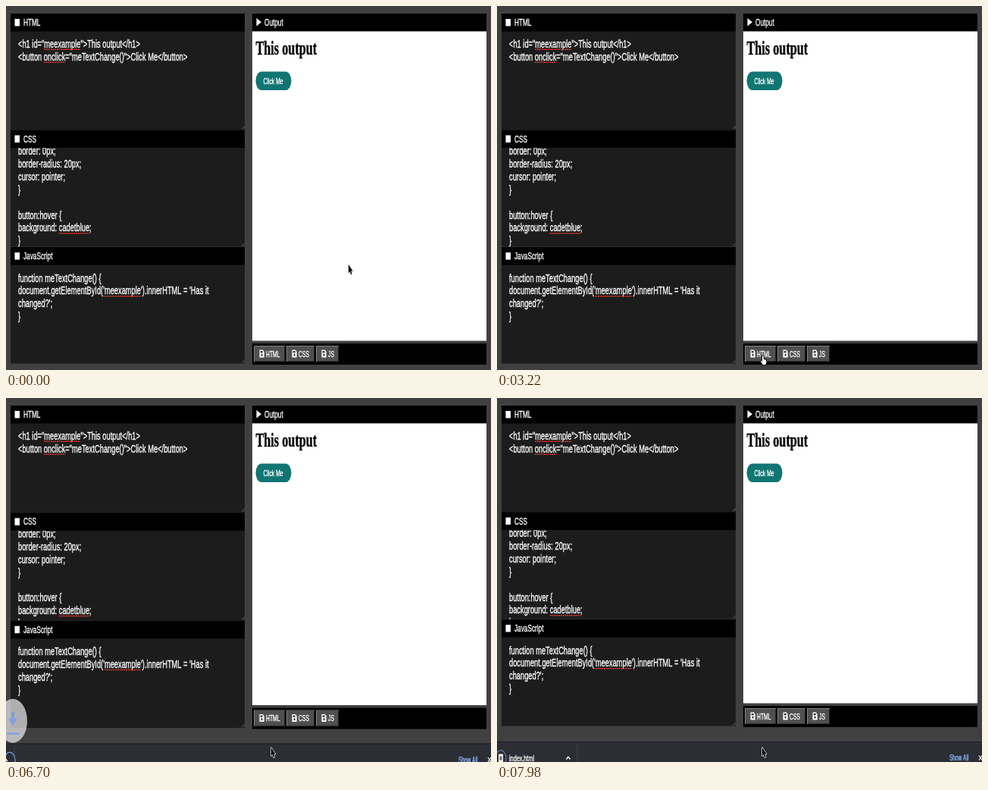
Animation of 640x480 px, one loop 8 s. Source, as an HTML page with a canvas:

```html
<!DOCTYPE html>
<html lang="en">
<head>
<meta charset="utf-8">
<title>Code editor download</title>
<style>
  html, body { margin: 0; width: 100%; height: 100%; overflow: hidden; background: #404040; }
  canvas { display: block; width: 640px; height: 480px; }
</style>
</head>
<body>
<canvas id="stage" width="640" height="480"></canvas>
<script>
const ctx = document.getElementById('stage').getContext('2d');
const LOOP = 8000;
const SQUEEZE = 0.62; // the screen is shown narrower than it was laid out
const SANS = '"Liberation Sans", Arial, sans-serif';
const SERIF = '"Liberation Serif", Times, serif';
const BODY = '#404040', PANEL = '#1c1c1c', INK = '#fff';

const htmlCode = [
  ['<h1 id="meexample">This output</h1>', 'meexample'],
  ['<button onclick="meTextChange()">Click Me</button>', 'onclick']
];
const cssCode = [
  ['border: 0px;'], ['border-radius: 20px;'], ['cursor: pointer;'], ['}'], [''],
  ['button:hover {'], ['background: cadetblue;', 'cadetblue'], ['}']
];
const jsCode = [
  ['function meTextChange() {'],
  ["document.getElementById('meexample').innerHTML = 'Has it", 'meexample'],
  ["changed?';"], ['}']
];

const clamp = v => Math.max(0, Math.min(1, v));
const span = (t, from, length) => clamp((t - from) / length);
const mix = (a, b, u) => a + (b - a) * u;
const easeOut = (u, power = 2) => 1 - (1 - u) ** power;

function rect(x, y, w, h, color) {
  ctx.fillStyle = color;
  ctx.fillRect(x, y, w, h);
}

function text(s, x, y, size, color = INK, family = SANS, weight = '') {
  ctx.save();
  ctx.translate(x, y);
  ctx.scale(SQUEEZE, 1);
  ctx.font = `${weight} ${size}px ${family}`;
  ctx.fillStyle = ctx.strokeStyle = color;
  ctx.lineWidth = 0.4;
  ctx.fillText(s, 0, 0);
  ctx.strokeText(s, 0, 0);
  ctx.restore();
}

function textWidth(s, size) {
  ctx.font = `${size}px ${SANS}`;
  return ctx.measureText(s).width * SQUEEZE;
}

function shape(points, fill, stroke, width = 1) {
  ctx.beginPath();
  points.forEach(([x, y]) => ctx.lineTo(x, y));
  ctx.closePath();
  if (stroke) {
    ctx.strokeStyle = stroke;
    ctx.lineWidth = width;
    ctx.lineJoin = 'round';
    ctx.stroke();
  }
  ctx.fillStyle = fill;
  ctx.fill();
}

function line(x1, y1, x2, y2, color, width, pattern = []) {
  ctx.save();
  ctx.strokeStyle = color;
  ctx.lineWidth = width;
  ctx.setLineDash(pattern);
  ctx.beginPath();
  ctx.moveTo(x1, y1);
  ctx.lineTo(x2, y2);
  ctx.stroke();
  ctx.restore();
}

function ring(x, y, rx, ry, color, width) {
  ctx.strokeStyle = color;
  ctx.lineWidth = width;
  ctx.beginPath();
  ctx.ellipse(x, y, rx, ry, 0, 0, 7);
  ctx.stroke();
}

function panel(title, top, bottom, lines, base) {
  const body = top + 23.5;
  rect(6, top, 309, bottom - top, PANEL);
  ctx.save();
  ctx.beginPath();
  ctx.rect(6, body, 309, bottom - body);
  ctx.clip();
  lines.forEach(([s, typo], i) => {
    const y = base + i * 16.9;
    text(s, 16, y, 15);
    if (typo) {
      const x = 16 + textWidth(s.slice(0, s.indexOf(typo)), 15);
      line(x, y + 2.3, x + textWidth(typo, 15), y + 2.3, '#e0392e', 1.5, [2, 0.8]);
    }
  });
  line(311, bottom - 1, 315, bottom - 5, '#777', 0.7);
  line(313, bottom - 1, 315, bottom - 3, '#777', 0.7);
  ctx.restore();
  rect(6, top, 309, 23.5, '#000');
  rect(11.5, top + 7, 6.5, 9.5, INK);
  text(title, 23, top + 16, 13.3);
}

function saveButton(label, x, w, y) {
  rect(x, y, w, 21, '#808080');
  rect(x + 1, y + 1, w - 1, 20, '#2c2c2c');
  rect(x + 1, y + 1, w - 2, 19, '#505050');
  const ix = x + 7.5, iy = y + 5.5;
  shape([[ix, iy], [ix + 4.5, iy], [ix + 6.2, iy + 2.5], [ix + 6.2, iy + 10], [ix, iy + 10]], INK);
  rect(ix + 1.2, iy + 1.5, 3, 2.3, '#333');
  ctx.fillStyle = '#333';
  ctx.beginPath();
  ctx.ellipse(ix + 3.1, iy + 6.6, 1.1, 1.6, 0, 0, 7);
  ctx.fill();
  text(label, x + 16, y + 14.5, 11);
}

function result(lift) {
  rect(325, 10, 309, 23.5, '#000');
  shape([[330.5, 16], [337, 21.3], [330.5, 26.5]], INK);
  text('Output', 341, 26, 13.3);
  rect(325, 33.5, 309, 408 - lift, '#fff');
  text('This output', 329.5, 63.5, 26.2, '#000', SERIF, 'bold');
  ctx.save();
  ctx.translate(329.5, 86.5);
  ctx.scale(SQUEEZE, 1);
  ctx.fillStyle = '#107573';
  ctx.beginPath();
  ctx.roundRect(0, 0, 47 / SQUEEZE, 24.5, 12.2);
  ctx.fill();
  ctx.restore();
  text('Click Me', 339.5, 102.5, 11);
  rect(325, 445 - lift, 309, 28, '#000');
  saveButton('HTML', 327, 41, 448 - lift);
  saveButton('CSS', 370, 37, 448 - lift);
  saveButton('JS', 409, 30, 448 - lift);
}

function shelf(t, lift) {
  const top = 492 - lift;
  if (top >= 480) return;
  rect(0, top, 640, 480 - top, '#2b2e34');
  rect(0, top, 640, 1, '#1c1e22');
  const edge = mix(-14, 106, easeOut(span(t, 6540, 1440)));
  const mid = top + 21.5;

  ctx.save();
  ctx.beginPath();
  ctx.rect(0, top, Math.max(0, edge - 17), 40);
  ctx.clip();
  text('index.html', 16, mid + 4.5, 11.7);
  ctx.restore();

  ctx.save();
  ctx.globalAlpha = mix(1, 0.6, span(t, 7500, 480));
  ring(5, mid + 0.5, 7, 10.5, '#6f9fe8', 1.3);
  ctx.globalAlpha = span(t, 6900, 200);
  rect(2, mid - 5, 6, 11, '#f4f4f4');
  rect(3.5, mid - 2, 3, 5, '#666');
  ctx.restore();

  line(edge - 14.5, mid + 2, edge - 12, mid - 1.5, INK, 1.3);
  line(edge - 12, mid - 1.5, edge - 9.5, mid + 2, INK, 1.3);
  line(edge, top + 4, edge, 480, '#5c6068', 0.8, [1, 1]);
  text('Show All', 597, mid + 3.5, 10.5, '#8ab4f8');
  line(636, mid - 3, 640, mid + 3, INK, 1.2);
  line(636, mid + 3, 640, mid - 3, INK, 1.2);
}

// sinks by its own height, most solid halfway
function bubble(t) {
  const u = span(t, 6410, 1200);
  if (u <= 0 || u >= 1) return;
  const x = 9, y = mix(412, 469, u), blue = '#6b9cf0';
  ctx.save();
  ctx.globalAlpha = 1 - 4 * (u - 0.5) ** 2;
  ctx.fillStyle = '#e6e6e8';
  ctx.beginPath();
  ctx.ellipse(x, y, 19, 29, 0, 0, 7);
  ctx.fill();
  rect(x - 2, y - 12, 4, 9, blue);
  shape([[x - 6, y - 3], [x + 6, y - 3], [x, y + 6]], blue);
  rect(x - 8, y + 15.5, 16, 2.5, blue);
  ctx.restore();
}

function pointer(t, lift) {
  const u = span(t, 860, 2360);
  const x = mix(452, 350, easeOut(u, 1.8));
  const y = mix(341, 461, easeOut(u, 2.05));
  const over = x < 407 && y > 448 - lift && y < 469 - lift;
  if (t >= 5480 && t < 6180) {
    ctx.save();
    ctx.globalAlpha = 1 - span(t, 6040, 140);
    ring(351, 459.5, 15.5, 22, '#d8d8d8', 3.4);
    ring(351, 459.5, 15.5, 22, '#000', 2);
    ctx.restore();
  }
  ctx.save();
  ctx.translate(x, y);
  if (over) {
    shape([[0, 0.5], [1.5, 0.5], [2, 5], [5, 5.8], [5.5, 8], [4.5, 12], [0.8, 12], [-2.2, 7.5], [-1.5, 6.5], [0, 8]],
      '#fff', '#000', 1.6);
  } else {
    shape([[0, 0], [0, 11], [1.7, 9], [3.2, 13], [4.6, 12.3], [3.2, 8.6], [5.6, 8.6]],
      '#000', '#e8e8e8', 1.4);
  }
  ctx.restore();
}

function draw(t) {
  const lift = 39 * easeOut(span(t, 6540, 216));
  const a = lift / 3, b = a * 2;
  rect(0, 0, 640, 480, BODY);
  panel('HTML', 10, 163 - a, htmlCode, 55);
  panel('CSS', 163.5 - a, 317.5 - b, cssCode, 196 - a);
  panel('JavaScript', 318 - b, 471.5 - lift, jsCode, 363.5 - b);
  result(lift);
  shelf(t, lift);
  bubble(t);
  pointer(t, lift);
}

const start = performance.now();
function tick() {
  draw((performance.now() - start) % LOOP);
  requestAnimationFrame(tick);
}
tick();
</script>
</body>
</html>
```
